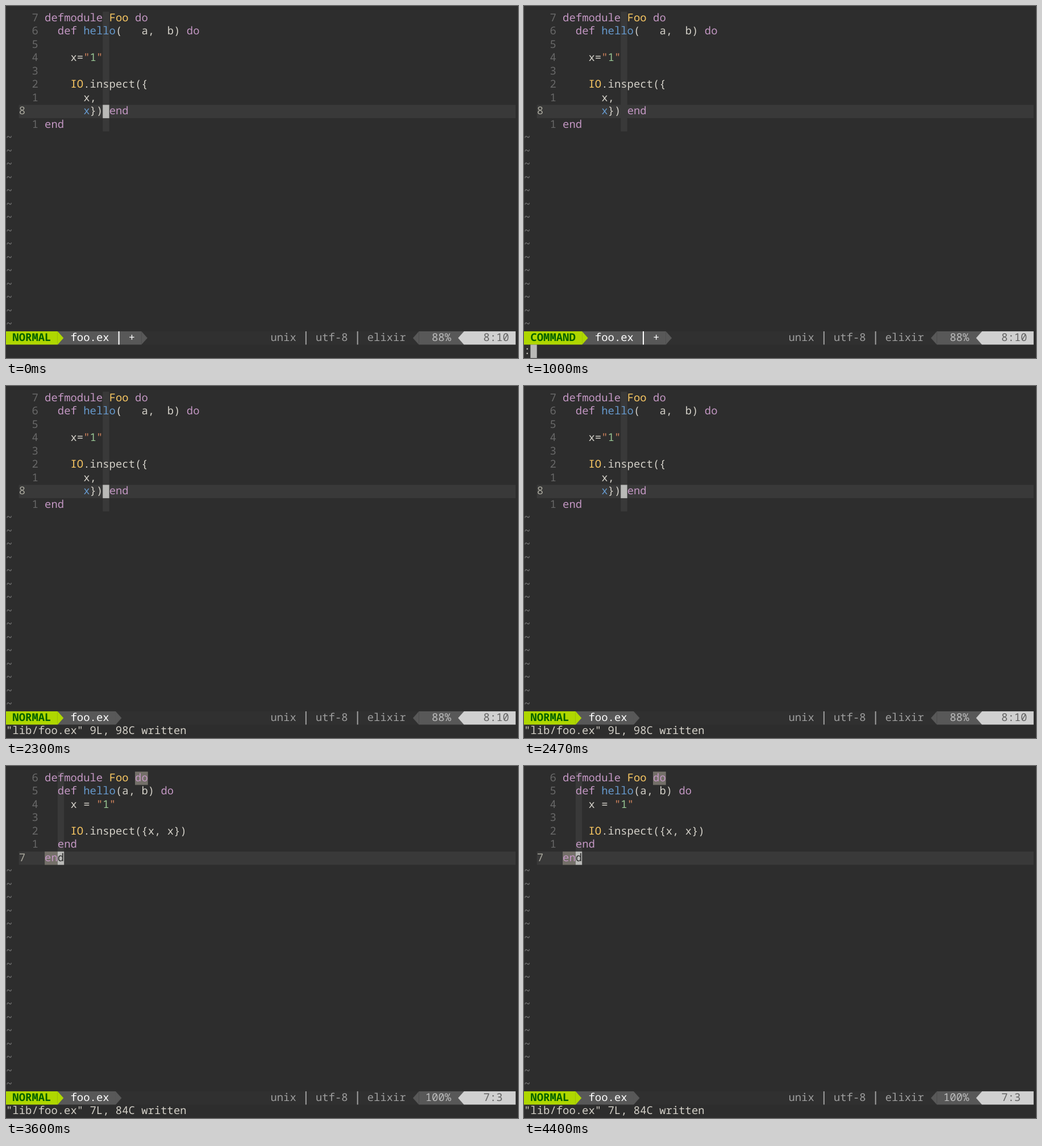
An HTML page for the animation above (4.43 s loop, 901 by 621 pixels).

```html
<!DOCTYPE html>
<html lang="en">
<head>
<meta charset="utf-8">
<title>Format on save</title>
<style>
  html, body { margin: 0; width: 100%; height: 100%; overflow: hidden; background: #2d2d2d; }
  svg { display: block; width: 901px; height: 621px; }
  text {
    font: 18.92px "Noto Sans Mono", "DejaVu Sans Mono", monospace;
    white-space: pre;
    text-rendering: geometricPrecision;
  }
  .bold { font-weight: 700; }
</style>
</head>
<body>
<svg id="screen" viewBox="0 0 901 621"></svg>
<script>
const LOOP = 4430;
const CW = 11.352, RH = 23.5, TOP = 9.9, BASE = 16.6;
const COLS = 79, STATUS = 24, CMD = 25, GUTTER = 6;

const C = {
  fg: '#d3d0c8', keyword: '#c397c3', type: '#fac863', func: '#6699cc',
  quote: '#d7875f', string: '#99c794', dim: '#686868', tilde: '#7c7c7c', number: '#a8a79c',
  line: '#393939', cursor: '#b9b9b7', match: '#747069', dark: '#2d2d2d',
  bar: '#303030', mid: '#585858', mode: '#afd700', modeText: '#005f00',
  info: '#9e9e9e', percent: '#bcbcbc', pos: '#d0d0d0', posText: '#626262'
};

const draft = {
  code: ['defmodule Foo do', '  def hello(   a,  b) do', '', '    x="1"', '',
    '    IO.inspect({', '      x,', '      x}) end', 'end'],
  row: 7, col: 15, percent: ' 88%', pos: '8:10', match: []
};
const formatted = {
  code: ['defmodule Foo do', '  def hello(a, b) do', '    x = "1"', '',
    '    IO.inspect({x, x})', '  end', 'end'],
  row: 6, col: 8, percent: '100%', pos: '7:3', match: [[0, 20, 2], [6, 6, 2]]
};

const syntax = [
  [/\b(?:defmodule|def|do|end)\b/g, C.keyword],
  [/\b(?:Foo|IO)\b/g, C.type],
  [/hello|x(?=}\) end)/g, C.func],
  [/"/g, C.quote],
  [/\d/g, C.string]
];

const x = col => col * CW;
const y = row => TOP + row * RH;

const box = (row, col, w, fill, h = 1) =>
  `<rect x="${x(col)}" y="${y(row)}" width="${x(w)}" height="${h * RH}" fill="${fill}"/>`;

const text = (row, col, str, fill, cls = '') =>
  `<text class="${cls}" x="${x(col)}" y="${y(row) + BASE}" fill="${fill}">${str}</text>`;

const arrow = (col, dir, fill) => {
  const from = x(dir > 0 ? col : col + 1), t = y(STATUS);
  return `<path d="M${from} ${t}l${dir * CW * 0.92} ${RH / 2}L${from} ${t + RH}z" fill="${fill}"/>`;
};

const divider = (col, fill) =>
  `<rect x="${x(col + 0.5) - 1}" y="${y(STATUS)}" width="2" height="${RH}" fill="${fill}"/>`;

function codeLine(row, line) {
  let plain = line, out = '';
  for (const [pattern, color] of syntax) {
    for (const m of line.matchAll(pattern)) {
      const end = m.index + m[0].length;
      out += text(row, GUTTER + m.index, m[0], color);
      plain = plain.slice(0, m.index) + ' '.repeat(m[0].length) + plain.slice(end);
    }
  }
  for (const m of plain.matchAll(/\S+/g)) out += text(row, GUTTER + m.index, m[0], C.fg);
  return out;
}

function editor(buf, focused) {
  const { code, row, col } = buf;
  let out = box(row, 2, COLS - 2, C.line) + box(0, col, 1, C.line, code.length);
  for (const [r, c, w] of buf.match) out += box(r, c, w, C.match);
  code.forEach((line, r) => {
    out += r === row
      ? text(r, 2, r + 1, C.number)
      : text(r, 4, Math.abs(r - row), C.dim);
    out += codeLine(r, line);
  });
  if (focused) {
    out += box(row, col, 1, C.cursor) + text(row, col, code[row][col - GUTTER], C.dark);
  }
  for (let r = code.length; r < STATUS; r++) out += text(r, 0, '~', C.tilde);
  return out;
}

function statusBar(buf, mode, modified) {
  const a = mode.length + 2;
  const b = a + (modified ? 13 : 9);
  let out = box(STATUS, 0, COLS, C.bar)
    + box(STATUS, a, b - a, C.mid) + arrow(b, 1, C.mid)
    + box(STATUS, 0, a, C.mode) + arrow(a, 1, C.mode)
    + text(STATUS, 1, mode, C.modeText, 'bold')
    + text(STATUS, a + 2, 'foo.ex', '#fff');
  if (modified) out += divider(a + 9, '#fff') + text(STATUS, a + 11, '+', '#fff');
  return out
    + text(STATUS, 41, 'unix', C.info) + divider(46, C.info)
    + text(STATUS, 48, 'utf-8', C.info) + divider(54, C.info)
    + text(STATUS, 56, 'elixir', C.info)
    + arrow(63, -1, C.mid) + box(STATUS, 64, 7, C.mid)
    + text(STATUS, 65, buf.percent, C.percent)
    + arrow(70, -1, C.pos) + box(STATUS, 71, 8, C.pos)
    + text(STATUS, 74, buf.pos, C.posText);
}

function stateAt(t) {
  if (t < 1000) return { buf: draft, mode: 'NORMAL', modified: true, cmd: '' };
  if (t < 2300) {
    const typed = Math.max(0, Math.min(5, Math.floor((t - 1400) / 100)));
    return { buf: draft, mode: 'COMMAND', modified: true, cmd: ':' + 'write'.slice(0, typed) };
  }
  const done = t >= 2800;
  return {
    buf: done ? formatted : draft, mode: 'NORMAL', modified: false,
    cmd: `"lib/foo.ex" ${done ? '7L, 84C' : '9L, 98C'} written`
  };
}

const screen = document.getElementById('screen');
let shown = '';

function render(t) {
  const { buf, mode, modified, cmd } = stateAt(t);
  const key = mode + cmd;
  if (key === shown) return;
  shown = key;
  const typing = mode === 'COMMAND';
  screen.innerHTML = '<rect width="901" height="621" fill="#2d2d2d"/>'
    + editor(buf, !typing)
    + statusBar(buf, mode, modified)
    + text(CMD, 0, cmd, C.fg)
    + (typing ? box(CMD, cmd.length, 1, C.cursor) : '');
}

const start = performance.now();
function tick() {
  render((performance.now() - start) % LOOP);
  requestAnimationFrame(tick);
}
tick();
</script>
</body>
</html>
```
